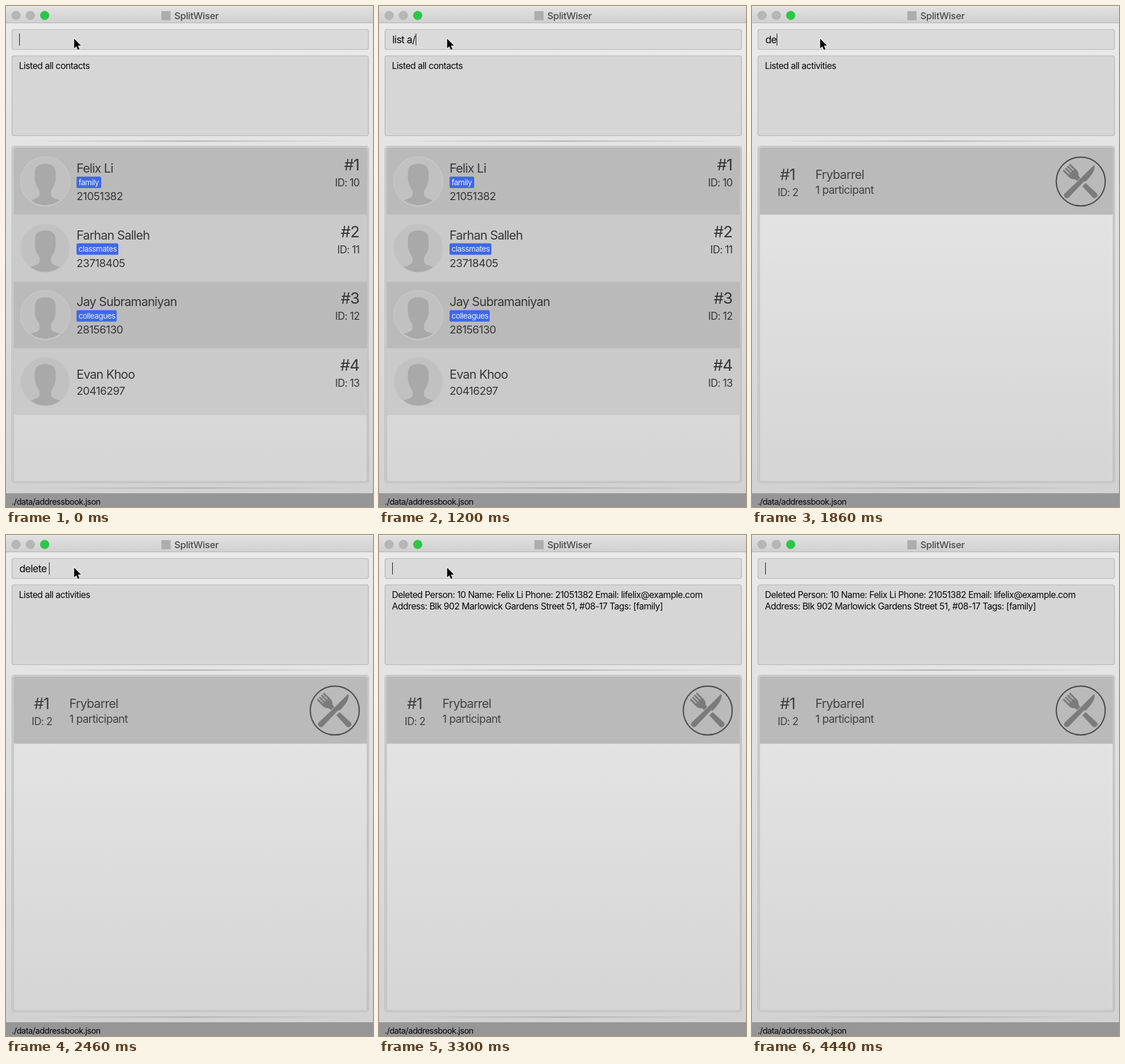
Write an HTML page that moves like this. It is 640 by 875 pixels and loops after 4500 ms.

```html
<!DOCTYPE html>
<html lang="en">
<head>
<meta charset="utf-8">
<title>SplitWiser</title>
<style>
  html, body { margin: 0; width: 100%; height: 100%; overflow: hidden; background: #ddd; }
  body { position: relative; font-family: Inter, "Liberation Sans", sans-serif; }
  svg, #entry { position: absolute; left: 0; top: 0; }
  svg { display: block; }
  text { fill: #363638; letter-spacing: -.037em; }
  .title { font-size: 16.5px; font-weight: 500; fill: #4a4a4a; letter-spacing: -.018em; }
  .result { font-size: 15.6px; fill: #050505; letter-spacing: -.032em; }
  .status { font-size: 14.5px; fill: #050505; letter-spacing: -.035em; }
  .name { font-size: 21.5px; }
  .detail { font-size: 19px; letter-spacing: -.03em; }
  .id { font-size: 18px; }
  .index { font-size: 27.5px; }
  .tag { font-size: 13.5px; fill: #eef1fb; }
  .end { text-anchor: end; }
  .mid { text-anchor: middle; }
  .activity text { fill: #414141; }
  #entry {
    left: 23.2px; top: 48px; height: 21px; line-height: 21px; white-space: pre;
    font-size: 17.5px; letter-spacing: -.034em; color: #050505;
  }
  #caret {
    display: inline-block; width: 1.2px; height: 21px; background: #111;
    vertical-align: top;
  }
</style>
</head>
<body>
<svg width="640" height="875" viewBox="0 0 640 875">
  <defs>
    <linearGradient id="bar" x2="0" y2="1">
      <stop stop-color="#e2e2e2"/><stop offset="1" stop-color="#cfcfcf"/>
    </linearGradient>
    <linearGradient id="page" x2="0" y2="1">
      <stop stop-color="#ebebeb"/><stop offset="1" stop-color="#d1d1d1"/>
    </linearGradient>
    <linearGradient id="list" x2="0" y2="1">
      <stop stop-color="#e6e6e6"/><stop offset=".2" stop-color="#e3e3e3"/>
      <stop offset="1" stop-color="#d5d5d5"/>
    </linearGradient>
    <linearGradient id="rule">
      <stop stop-color="#aaa" stop-opacity="0"/><stop offset=".5" stop-color="#aaa"/>
      <stop offset="1" stop-color="#aaa" stop-opacity="0"/>
    </linearGradient>
    <clipPath id="round"><circle r="41.5"/></clipPath>
    <g id="avatar">
      <circle r="43" fill="#c1c1c1" stroke="#c8c8c8" stroke-width="1.4"/>
      <path clip-path="url(#round)" fill="#a9a9a9" d="M-18-14C-19-27-10-31 0-31S19-27 18-14
        C18-8 19-6 17 2C15 10 11 13 10 17V24C12 31 28 31 31 37V44H-31V37
        C-28 31-12 31-10 24V17C-11 13-15 10-17 2C-19-6-18-8-18-14Z"/>
    </g>
  </defs>

  <rect width="640" height="875" fill="url(#page)"/>
  <rect width="640" height="30" fill="url(#bar)"/>
  <path d="M0 .5H640" stroke="#f0f0f0"/>
  <path d="M0 29.5H640" stroke="#b3b3b3"/>
  <g fill="#b6b6b6" stroke="#adadad" stroke-width=".8">
    <circle cx="17.5" cy="16.5" r="7.6"/>
    <circle cx="42.5" cy="16.5" r="7.6"/>
    <circle cx="67.5" cy="16.5" r="7.6" fill="#2ac845" stroke="#27c040"/>
  </g>
  <rect x="271" y="9" width="16" height="16" fill="#adadad"/>
  <text class="title" x="293.5" y="22.5">SplitWiser</text>

  <g stroke="#b4b4b4" stroke-width="1.2">
    <rect x="10.5" y="41" width="621.5" height="35" rx="3.5" fill="#dadada"/>
    <rect x="10.5" y="87" width="621.5" height="139.5" rx="3.5" fill="#d6d6d6"/>
    <rect x="10.5" y="245.2" width="621.5" height="587.3" rx="4" fill="#dedede"/>
    <rect x="13" y="247.5" width="617" height="583" rx="3" fill="url(#list)"/>
  </g>
  <rect x="30" y="235" width="580" height="1.8" fill="url(#rule)"/>
  <rect x="30" y="841" width="580" height="1.8" fill="url(#rule)"/>
  <rect y="851" width="640" height="24" fill="#969696"/>
  <text class="status" x="10" y="871">./data/addressbook.json</text>

  <text class="result" x="22.5" y="110" id="line1"></text>
  <text class="result" x="22.5" y="130" id="line2"></text>

  <g id="contacts"></g>

  <g id="activity" class="activity">
    <path d="M13.6 364.5V251q0-3 3-3H626.4q3 0 3 3V364.5Z" fill="#bababa"/>
    <text class="index mid" x="62" y="304">#1</text>
    <text class="id mid" x="62.7" y="332">ID: 2</text>
    <text class="name" x="110.5" y="302">Frybarrel</text>
    <text class="detail" x="110.5" y="328">1 participant</text>
    <g transform="translate(573.3 306.5)" fill="#7b7b7b" stroke-linecap="round">
      <circle r="42.7" fill="none" stroke="#4d4d4d" stroke-width="2.2"/>
      <g transform="rotate(-45)">
        <path d="M-7.5-34V-22M-2.5-34V-22M2.5-34V-22M7.5-34V-22" stroke="#7b7b7b" stroke-width="3.2"/>
        <path d="M-9.1-23H9.1V-19C9.1-12 4-12 4-7V-5H-4V-7C-4-12-9.1-12-9.1-19Z"/>
        <path d="M-4 8H4L5 34Q5 39 0 39T-5 34Z"/>
      </g>
      <path transform="rotate(45)" d="M-3-37C4-32 6.5-20 6-5H4L5 34Q5 39 0 39T-5 34L-4 3V-36Z"/>
    </g>
  </g>

  <path id="cursor" d="M0 0V17L3.8 13.4L6.6 19.8L9.4 18.6L6.6 12.3H12Z"
    stroke="#fff" stroke-width="1.8" paint-order="stroke" stroke-linejoin="round"/>
</svg>
<div id="entry"><span id="typed"></span><i id="caret"></i></div>

<script>
const $ = id => document.getElementById(id);
const LOOP = 4500, TICK = 60;

const people = [
  ['Felix Li', '21051382', 'family', 43],
  ['Farhan Salleh', '23718405', 'classmates', 73],
  ['Jay Subramaniyan', '28156130', 'colleagues', 70],
  ['Evan Khoo', '20416297']
];

const label = (cls, x, y, str) => `<text class="${cls}" x="${x}" y="${y}">${str}</text>`;

function contactRow([name, phone, tag, width], i) {
  const shift = tag ? 0 : 10;
  const shape = i ? 'M13.6 0H629.4V116.7H13.6Z' : 'M13.6 116.7V3q0-3 3-3H626.4q3 0 3 3V116.7Z';
  return `<g transform="translate(0 ${248 + i * 116.6})">
    <path d="${shape}" fill="${i % 2 ? '#cacaca' : '#bababa'}"/>
    <use href="#avatar" x="68.5" y="58.5"/>
    ${label('name', 123, 43 + shift, name)}
    ${tag ? `<rect x="123" y="50" width="${width}" height="20" rx="2.5" fill="#3f68e6"/>`
      + label('tag', 126.5, 64.7, tag) : ''}
    ${label('detail', 123, 91 - shift, phone)}
    ${label('index end', 616, 39, '#' + (i + 1))}
    ${label('id end', 616.5, 67, 'ID: ' + (i + 10))}
  </g>`;
}
$('contacts').innerHTML = people.map(contactRow).join('');

// Key presses; '\n' submits the command.
const keys = [
  [60, 'l'], [360, 'i'], [420, 's'], [480, 't'], [600, ' '], [660, 'a'], [840, '/'], [1260, '\n'],
  [1680, 'd'], [1800, 'e'], [1920, 'l'], [2040, 'e'], [2220, 't'], [2340, 'e'], [2460, ' '],
  [2700, '1'], [3240, '\n']
];

const results = [
  ['Listed all contacts', ''],
  ['Listed all activities', ''],
  ['Deleted Person: 10 Name: Felix Li Phone: 21051382 Email: lifelix@example.com',
   'Address: Blk 902 Marlowick Gardens Street 51, #08-17 Tags: [family]']
];

const mix = (a, b, k) => a + (b - a) * k;

function cursorAt(t) {
  if (t < 3960) {
    const k = Math.max(0, (t - 3540) / 420) ** 1.6;
    return [mix(118.8, 255.5, k), mix(57, 252.5, k)];
  }
  const k = (t - 3960) / 120;
  return [255.5 + 58 * k - 153 * k * k, 252.5 + 940 * k - 331 * k * k];
}

function render(now) {
  const t = Math.floor(now % LOOP / TICK) * TICK;
  let text = '', stage = 0, last = 0;
  for (const [at, key] of keys) {
    if (at > t) break;
    last = at;
    if (key === '\n') { text = ''; stage++; } else text += key;
  }
  $('typed').textContent = text;
  $('caret').style.visibility = (t - last) % 1000 < 500 ? 'visible' : 'hidden';
  [$('line1').textContent, $('line2').textContent] = results[stage];
  $('contacts').style.display = stage ? 'none' : '';
  $('activity').style.display = stage ? '' : 'none';

  const [x, y] = cursorAt(t);
  $('cursor').setAttribute('transform', `translate(${x} ${y})`);
  $('cursor').style.display = t < 4140 ? '' : 'none';
}

function frame() {
  render(performance.now());
  requestAnimationFrame(frame);
}
frame();
</script>
</body>
</html>
```
